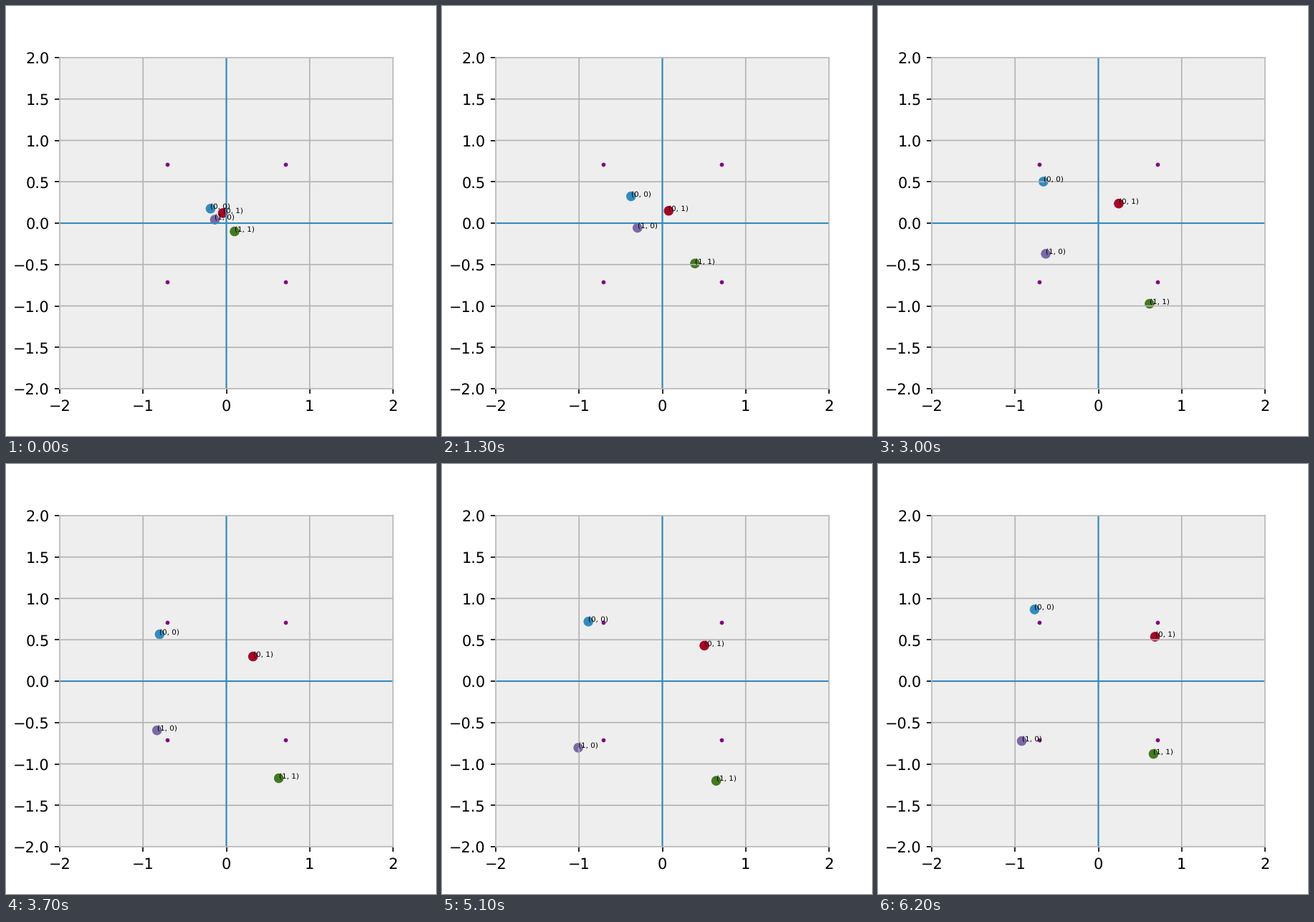
Animation of 600x600 px, one loop 6.3 s. Source, as a matplotlib script:

```python
import itertools
import numpy as np
import matplotlib.pyplot as plt
from matplotlib.animation import FuncAnimation

FRAMES = 63
INTERVAL = 100

plt.rcParams.update({
    "font.family": "DejaVu Sans",
    "font.size": 10,
    "text.hinting": "none",
    "axes.facecolor": "#eeeeee",
    "axes.edgecolor": "#bcbcbc",
    "axes.grid": True,
    "axes.axisbelow": "line",
    "grid.color": "#b2b2b2",
    "grid.linewidth": 0.8,
    "patch.linewidth": 0.5,
})

COLORS = ["#348abd", "#a60628", "#7a68a6", "#467821"]
BITS = list(itertools.product((0, 1), repeat=2))

# Each point starts near the centre, drifts out, turns and settles.
KEY_STEPS = np.array([0, 22, 47, FRAMES - 1])
PATHS = np.array([
    [(-.19, .175), (-.508, .424), (-.905, .67), (-.766, .866)],
    [(-.043, .122), (.163, .182), (.445, .392), (.68, .537)],
    [(-.138, .043), (-.434, -.165), (-1.01, -.80), (-.92, -.723)],
    [(.099, -.10), (.551, -.736), (.638, -1.27), (.662, -.879)],
])
SLOPES = np.gradient(PATHS, KEY_STEPS, axis=1)


def positions(step):
    """Smooth cubic path through the key points."""
    i = np.clip(np.searchsorted(KEY_STEPS, step) - 1, 0, len(KEY_STEPS) - 2)
    h = KEY_STEPS[i + 1] - KEY_STEPS[i]
    u = (step - KEY_STEPS[i]) / h
    blend = u * u * (3 - 2 * u)
    return ((1 - blend) * PATHS[:, i] + blend * PATHS[:, i + 1]
            + h * u * (1 - u) * ((1 - u) * SLOPES[:, i] - u * SLOPES[:, i + 1]))


fig, ax = plt.subplots(figsize=(4, 4), dpi=150)
ax.set(xlim=(-2, 2), ylim=(-2, 2),
       xticks=np.arange(-2, 3), yticks=np.arange(-2, 2.5, 0.5))
ax.axhline(0, color=COLORS[0], lw=1)
ax.axvline(0, color=COLORS[0], lw=1)

corners = np.sqrt(0.5) * np.array(list(itertools.product((-1, 1), repeat=2)))
ax.scatter(*corners.T, s=5, color="purple")
points = ax.scatter(*positions(0).T, s=36, c=COLORS)
labels = [ax.text(0, 0, str(bits), fontsize=5) for bits in BITS]

# Keep lines and dots at their exact sub-pixel places.
for artist in fig.findobj():
    artist.set_snap(False)


def update(step):
    xy = positions(step)
    points.set_offsets(xy)
    for label, pos in zip(labels, xy):
        label.set_position(pos)
    return [points, *labels]


anim = FuncAnimation(fig, update, frames=FRAMES, interval=INTERVAL,
                     repeat=True, repeat_delay=0)
plt.show()
```
